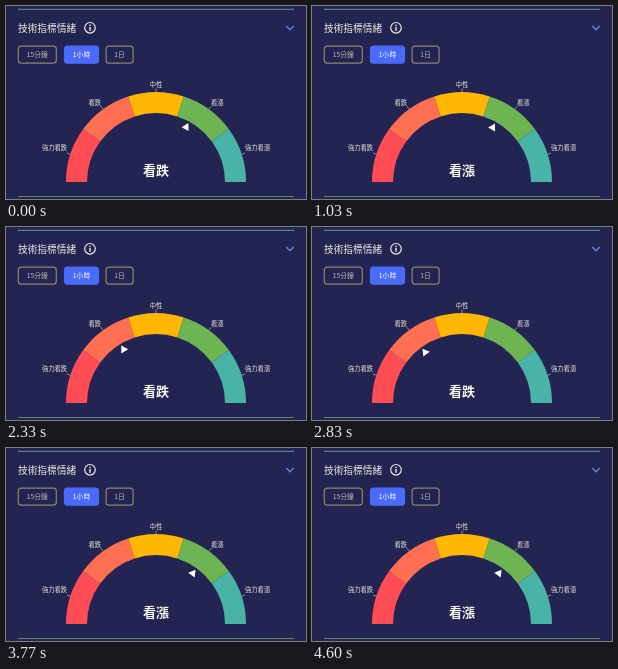
An HTML page with a canvas that plays this animation: 300 by 193 pixels, repeating every 4630 ms.

```html
<!DOCTYPE html>
<html lang="zh-Hant">
<head>
<meta charset="utf-8">
<title>技術指標情緒</title>
<style>
html, body { margin: 0; width: 100%; height: 100%; overflow: hidden; background: #242452; }
canvas { display: block; width: 300px; height: 193px; }
</style>
</head>
<body>
<canvas id="stage"></canvas>
<script>
const W = 300, H = 193, LOOP = 4630;
const FONT = '"Noto Sans CJK TC", "Noto Sans CJK", "Noto Sans CJK SC", "Noto Sans CJK JP", sans-serif';
const CENTER = { x: 150, y: 176 }, OUTER = 90, INNER = 69, POINTER_RADIUS = 62.6;
const TURN = 300;
const SWING = 36;
const CREAM = '#e9ecdc';

const sectors = [
  { color: '#ff4d56', label: '強力看跌', x: 48.5, y: 141.3 },
  { color: '#ff6f52', label: '看跌', x: 88.7, y: 96.7 },
  { color: '#ffb703', label: '中性', x: 150, y: 78.4 },
  { color: '#6db553', label: '看漲', x: 211.3, y: 96.7 },
  { color: '#4ab3a8', label: '強力看漲', x: 251.6, y: 141.3 }
];

// Each change of sentiment swaps the word at once; the pointer then eases over.
const changes = [
  { at: -30, side: -1 },
  { at: 840, side: 1 },
  { at: 2126, side: -1 },
  { at: 2850, side: 1 }
];

const canvas = document.getElementById('stage');
const ctx = canvas.getContext('2d');
const dpr = window.devicePixelRatio || 1;
canvas.width = Math.round(W * dpr);
canvas.height = Math.round(H * dpr);
ctx.scale(dpr, dpr);

const radians = deg => deg * Math.PI / 180;

function polar(deg, radius, origin = CENTER) {
  const a = radians(deg);
  return [origin.x + radius * Math.sin(a), origin.y - radius * Math.cos(a)];
}

function bezier(s, a, b) {
  return 3 * (1 - s) * (1 - s) * s * a + 3 * (1 - s) * s * s * b + s * s * s;
}

// The standard "ease" curve, solved by bisection.
function ease(p) {
  if (p <= 0) return 0;
  if (p >= 1) return 1;
  let low = 0, high = 1;
  for (let i = 0; i < 24; i++) {
    const mid = (low + high) / 2;
    if (bezier(mid, 0.25, 0.25) < p) low = mid; else high = mid;
  }
  return bezier(low, 0.1, 1);
}

function text(str, x, y, size, { color = CREAM, weight = 500, align = 'center' } = {}) {
  ctx.font = `${weight} ${size}px ${FONT}`;
  ctx.fillStyle = color;
  ctx.textAlign = align;
  ctx.textBaseline = 'alphabetic';
  ctx.fillText(str, x, y + size * 0.37);
}

function line(points, color, width) {
  ctx.beginPath();
  points.forEach(([x, y]) => ctx.lineTo(x, y));
  ctx.strokeStyle = color;
  ctx.lineWidth = width;
  ctx.stroke();
}

function button(label, x, width, active) {
  ctx.beginPath();
  ctx.roundRect(x + 0.5, 40.2, width - 1, 17, 3);
  if (active) {
    ctx.fillStyle = '#4a6bfa';
    ctx.fill();
  }
  ctx.strokeStyle = active ? '#4a6bfa' : '#85886a';
  ctx.lineWidth = 1.2;
  ctx.stroke();
  text(label, x + width / 2, 48.8, 6.8, { color: active ? '#ffffff' : '#b9bbae' });
}

function drawHeader() {
  line([[12, 3.3], [288, 3.3]], '#5b98a0', 1);
  line([[12, 190.5], [288, 190.5]], '#568a70', 1);
  text('技術指標情緒', 12, 22, 9.7, { align: 'left' });
  ctx.beginPath();
  ctx.arc(84, 21.8, 5.3, 0, Math.PI * 2);
  ctx.strokeStyle = CREAM;
  ctx.lineWidth = 1.2;
  ctx.stroke();
  ctx.fillStyle = CREAM;
  ctx.fillRect(83.3, 18.7, 1.4, 1.4);
  ctx.fillRect(83.3, 21, 1.4, 3.8);
  line([[280.3, 20], [284, 23.7], [287.7, 20]], '#5f82e6', 1.5);
  button('15分鐘', 11.8, 39, false);
  button('1小時', 58, 35, true);
  button('1日', 99.6, 28, false);
}

function drawGauge() {
  sectors.forEach(({ color, label, x, y }, i) => {
    const start = Math.PI + radians(36 * i), end = start + radians(36);
    ctx.beginPath();
    ctx.arc(CENTER.x, CENTER.y, OUTER, start, end);
    ctx.arc(CENTER.x, CENTER.y, INNER, end, start, true);
    ctx.closePath();
    ctx.fillStyle = color;
    ctx.fill();
    const middle = (i - 2) * 36;
    line([polar(middle, OUTER), polar(middle, OUTER + 3.5)], '#b8b8c4', 0.7);
    text(label, x, y, 6.3);
  });
}

function drawPointer(deg) {
  const [x, y] = polar(deg, POINTER_RADIUS);
  ctx.beginPath();
  for (const turn of [0, 120, 240]) ctx.lineTo(...polar(deg + turn, 4.6, { x, y }));
  ctx.closePath();
  ctx.fillStyle = '#ffffff';
  ctx.fill();
}

function render(time) {
  const { at, side } = changes.filter(c => c.at <= time).pop();
  const angle = SWING * side * (2 * ease((time - at) / TURN) - 1);
  ctx.fillStyle = '#242452';
  ctx.fillRect(0, 0, W, H);
  drawHeader();
  drawGauge();
  drawPointer(angle);
  text(side < 0 ? '看跌' : '看漲', 150, 164.5, 13, { color: '#f6f7ee', weight: 700 });
}

const began = performance.now();
function tick() {
  render((performance.now() - began) % LOOP);
  requestAnimationFrame(tick);
}
tick();
</script>
</body>
</html>
```
